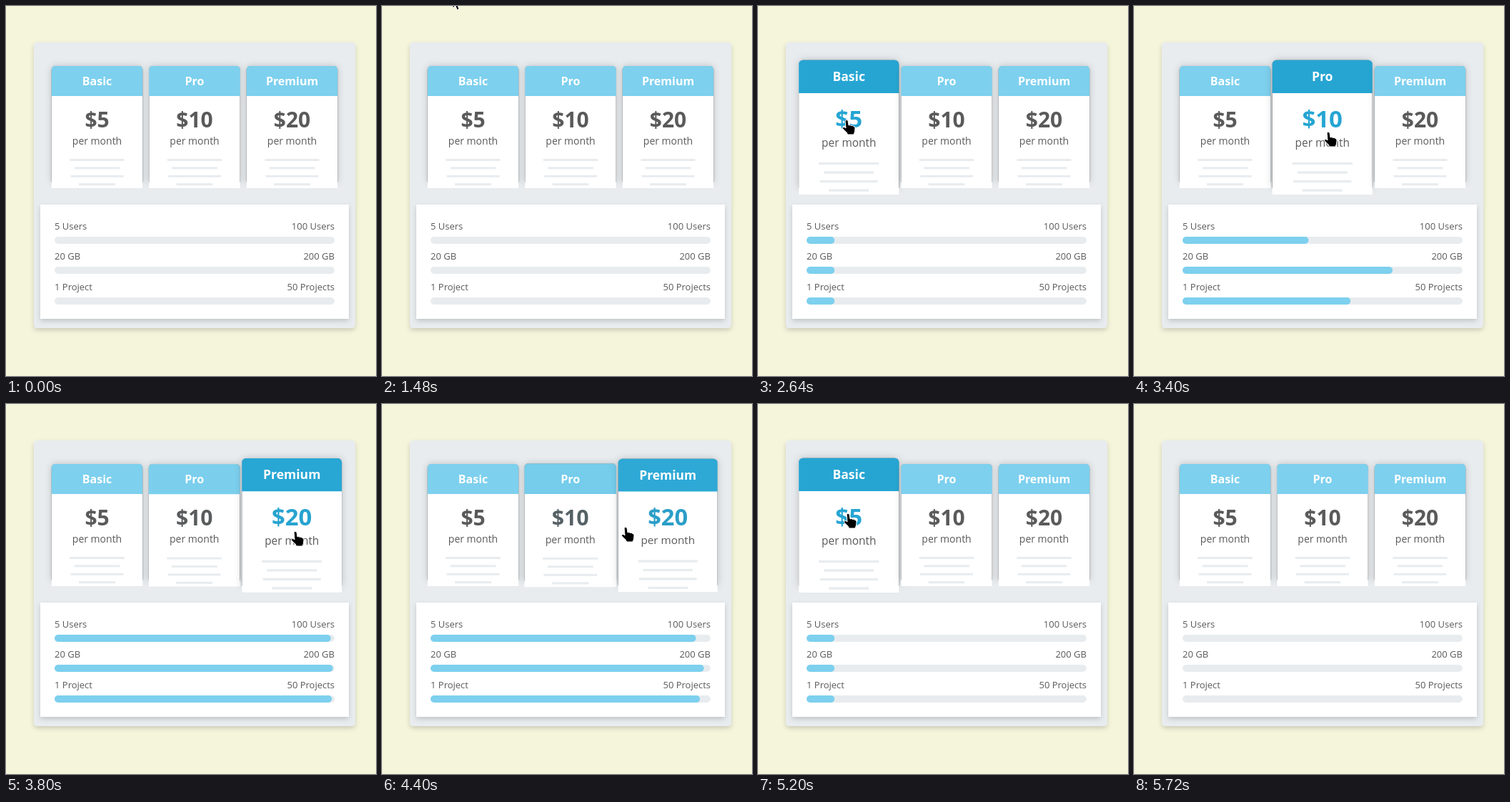
An HTML page for the animation above (6480 ms loop, 518 by 518 pixels).

```html
<!DOCTYPE html>
<html lang="en">
<head>
<meta charset="utf-8">
<title>Pricing table</title>
<style>
  html, body { margin: 0; width: 100%; height: 100%; overflow: hidden; background: #f5f5dc; }
  svg { display: block; width: 100vw; height: 100vh; }
  text { font-family: "Open Sans", sans-serif; fill: #5a5a5a; }
  .title { font-size: 16px; font-weight: 700; fill: #fff; }
  .price { font-size: 30px; font-weight: 700; }
  .period { font-size: 14px; }
  .limit { font-size: 13px; }
</style>
</head>
<body>
<svg id="stage" viewBox="0 0 518 518">
  <defs>
    <filter id="panelShadow" x="-10%" y="-10%" width="120%" height="120%">
      <feDropShadow dx="0" dy="3" stdDeviation="3" flood-opacity=".17"/>
    </filter>
    <filter id="cardShadow" x="-20%" y="-20%" width="140%" height="140%">
      <feDropShadow dx="0" dy="0" stdDeviation="5" flood-opacity=".2"/>
    </filter>
  </defs>
  <rect x="39" y="51" width="450" height="400" rx="5" fill="#e8ecef" filter="url(#panelShadow)"/>
  <g id="cards"></g>
  <rect x="48" y="278" width="432" height="160" fill="#fff" filter="url(#panelShadow)"/>
  <g id="bars"></g>
  <path id="cursor" stroke="#fff" stroke-width="1" stroke-linejoin="round"/>
</svg>
<script>
const LOOP = 6480, FADE = 300;
const LIGHT = [125, 208, 238], DARK = [38, 165, 211], GREY = [90, 90, 90];
const CARD_W = 127.4, MID_Y = 169.5, BAR_X = 68, BAR_W = 392;

const plans = [
  { name: 'Basic', price: '$5', fill: [.1, .1, .1] },
  { name: 'Pro', price: '$10', fill: [.45, .75, .6] },
  { name: 'Premium', price: '$20', fill: [1, 1, 1] }
];
const limits = [
  { from: '5 Users', to: '100 Users' },
  { from: '20 GB', to: '200 GB' },
  { from: '1 Project', to: '50 Projects' }
];
const NONE = { fill: [0, 0, 0] };
const [basic, pro, premium] = plans;

// Pointer trips: where each ends and which plan it hovers along the way.
const trips = [
  { start: 1480, end: 1920, x: 123, y: 159, hovers: [[1690, basic]] },
  { start: 2620, end: 2960, x: 271, y: 176, hovers: [[2770, pro]] },
  { start: 3380, end: 3760, x: 405, y: 178, hovers: [[3560, premium]] },
  { start: 4140, end: 4980, x: 126, y: 153, hovers: [[4370, pro], [4858, basic]] },
  { start: 5340, end: 5500, x: 112, y: -40, hovers: [[5400, NONE]] }
];
const ENTRY = { x: 99, y: -13 };
const hovers = [[0, NONE], ...trips.flatMap(trip => trip.hovers)];

const ARROW = 'M0 0V16L3.7 12.5L6.2 18.5L9 17.3L6.5 11.5H11.5Z';
const HAND = 'M-2 1.5Q0 -1 2 1.5L3 8Q5 6.8 6.5 8.5Q8.5 7.5 9.7 9.5Q12 9 12 12' +
  'L11.5 17L10 21H1.5L0 18Q-4 14.5 -5.5 12.5Q-6 10 -3 10.5L-1 12Z';

const byId = id => document.getElementById(id);
const mix = (a, b, p) => a + (b - a) * p;
const blend = (a, b, p) => `rgb(${a.map((v, i) => Math.round(mix(v, b[i], p)))})`;
const smooth = p => p * p * (3 - 2 * p);

function add(parent, tag, attrs, text) {
  const el = document.createElementNS('http://www.w3.org/2000/svg', tag);
  for (const key in attrs) el.setAttribute(key, attrs[key]);
  if (text) el.textContent = text;
  return parent.appendChild(el);
}

// cubic-bezier(.25, .1, .25, 1)
function ease(p) {
  if (p <= 0 || p >= 1) return p <= 0 ? 0 : 1;
  const curve = (a, b, s) => 3 * a * s * (1 - s) ** 2 + 3 * b * s * s * (1 - s) + s ** 3;
  let lo = 0, hi = 1;
  for (let i = 0; i < 24; i++) {
    const s = (lo + hi) / 2;
    if (curve(.25, .25, s) < p) lo = s; else hi = s;
  }
  return curve(.1, 1, lo);
}

function buildCard(plan, i) {
  const card = plan.card = add(byId('cards'), 'g', {});
  const label = (cls, y, text) => add(card, 'text', { class: cls, y, 'text-anchor': 'middle' }, text);
  const half = CARD_W / 2;
  const roundedTop = bottom =>
    `M${-half} ${bottom}V-80.5a5 5 0 0 1 5 -5H${half - 5}a5 5 0 0 1 5 5V${bottom}Z`;
  plan.x = 127.5 + 136.5 * i;
  add(card, 'path', { d: roundedTop(77), filter: 'url(#cardShadow)' });
  add(card, 'path', { d: roundedTop(85.5), fill: '#fff' });
  plan.head = add(card, 'path', { d: roundedTop(-43.5) });
  label('title', -58.8, plan.name);
  plan.cost = label('price', .5, plan.price);
  label('period', 24.4, 'per month');
  [.6, .5, .58, .4].forEach((part, row) => {
    const width = CARD_W * part;
    add(card, 'rect', { x: -width / 2, y: 44.5 + row * 11.4, width, height: 3, fill: '#e8ecef' });
  });
}

function buildBar(limit, i) {
  const bars = byId('bars');
  const y = Math.round(322.8 + 42.5 * i);
  add(bars, 'text', { class: 'limit', x: BAR_X, y: y - 10 }, limit.from);
  add(bars, 'text', { class: 'limit', x: BAR_X + BAR_W, y: y - 10, 'text-anchor': 'end' }, limit.to);
  const groove = { x: BAR_X, y, height: 10, rx: 5 };
  add(bars, 'rect', { ...groove, width: BAR_W, fill: '#e8ecef' });
  limit.bar = add(bars, 'rect', { ...groove, width: 0, fill: blend(LIGHT, LIGHT, 0) });
}

function drawCursor(t, hovered) {
  const k = trips.findLastIndex(trip => trip.start <= t);
  const cursor = byId('cursor');
  cursor.setAttribute('visibility', k < 0 ? 'hidden' : 'visible');
  if (k < 0) return;
  const to = trips[k], from = trips[k - 1] || ENTRY;
  const p = smooth(Math.min(1, (t - to.start) / (to.end - to.start)));
  const [x, y] = ['x', 'y'].map(axis => Math.round(mix(from[axis], to[axis], p)));
  cursor.setAttribute('d', hovered ? HAND : ARROW);
  cursor.setAttribute('transform', `translate(${x} ${y})`);
}

function draw(time) {
  const t = Math.floor(time / 40) * 40;
  const k = hovers.findLastIndex(h => h[0] <= t);
  const [since, now] = hovers[k];
  const before = k ? hovers[k - 1][1] : NONE;
  const p = ease((t - since) / FADE);

  for (const plan of plans) {
    const lift = plan === now ? p : plan === before ? 1 - p : 0;
    // Resting cards snap to whole pixels, lifted ones keep their fraction.
    const x = plan.x - (lift ? .3 : 0);
    const y = MID_Y + (lift ? .4 : 0);
    plan.card.setAttribute('transform', `translate(${x} ${y}) scale(${1 + lift * .1})`);
    plan.head.setAttribute('fill', blend(LIGHT, DARK, lift));
    plan.cost.style.fill = blend(GREY, DARK, lift);
  }
  limits.forEach((limit, i) =>
    limit.bar.setAttribute('width', BAR_W * mix(before.fill[i], now.fill[i], p)));
  drawCursor(t, now !== NONE);
}

plans.forEach(buildCard);
limits.forEach(buildBar);

const start = performance.now();
function tick() {
  draw((performance.now() - start) % LOOP);
  requestAnimationFrame(tick);
}
tick();
</script>
</body>
</html>
```
